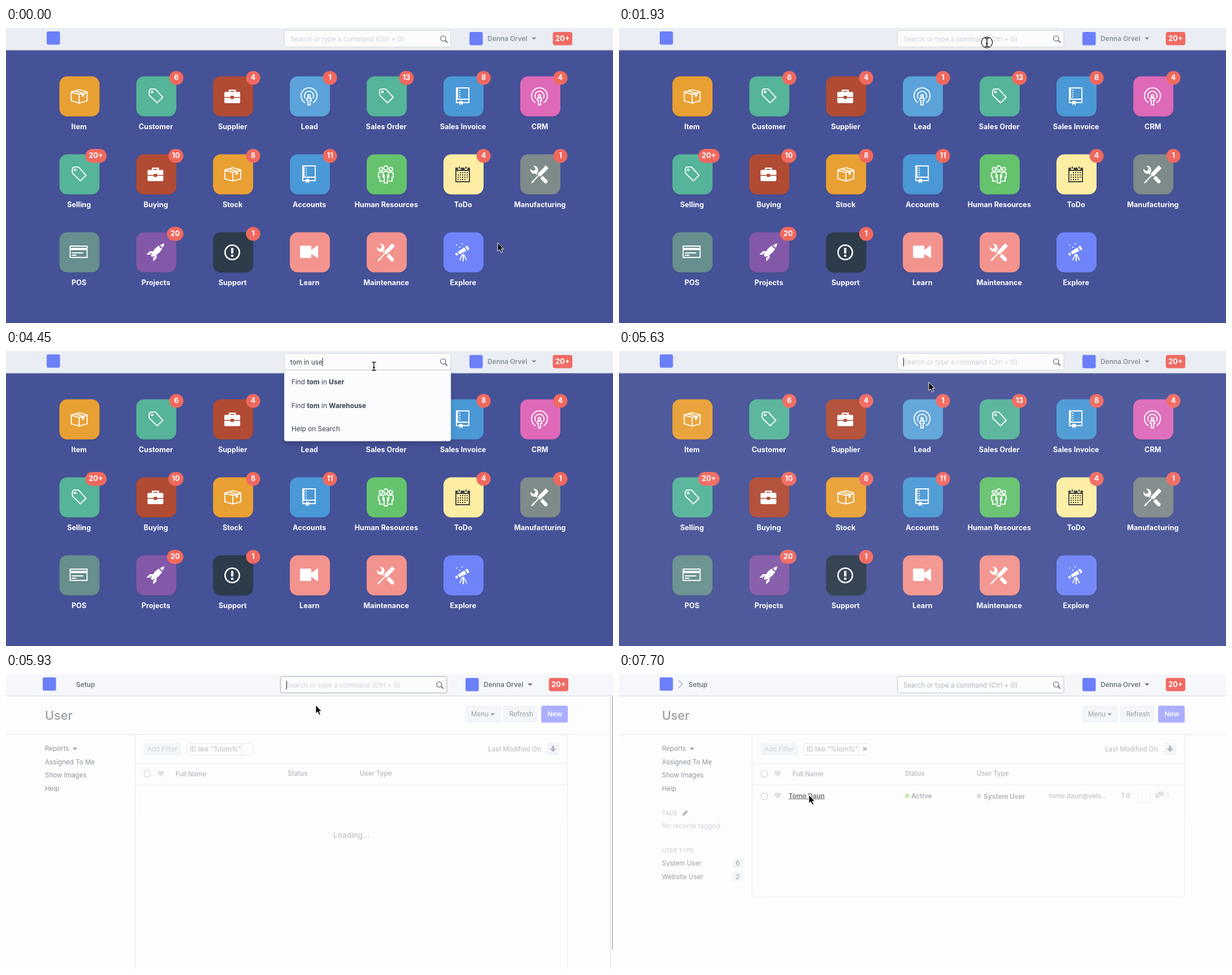
Recreate the animation shown at these times as an HTML page. Size 1074 by 522 pixels, loop 8000 ms.

```html
<!DOCTYPE html>
<html lang="en">
<head>
<meta charset="utf-8">
<title>Desk search</title>
<style>
html, body { margin: 0; height: 100%; overflow: hidden; background: #fdfdfd; }
svg { display: block; width: 100vw; height: 100vh; }
text { font: 11.6px Inter, Roboto, sans-serif; white-space: pre; }
.b { font-weight: 700; }
.m { font-weight: 500; }
.s { font-weight: 600; font-size: 11.8px; }
.c { text-anchor: middle; }
.label { font-size: 12.65px; fill: #fff; }
.small { font-size: 10.2px; }
.icon { fill: none; stroke: currentColor; stroke-width: .95; color: #fff; }
.icon .f { fill: currentColor; stroke: none; }
.tile { filter: drop-shadow(0 1px 1px rgba(0,0,0,.12)); }
.dark { fill: #1f2d3a; }
.grey { fill: #6c7680; }
.pale { fill: #a3adb7; }
.line { fill: none; stroke: #d3d9de; }
.btn { fill: #eaf0f5; }
#menu { filter: drop-shadow(0 5px 5px rgba(0,0,0,.2)); }
#menu text { fill: #36414c; font-size: 11.85px; }
</style>
</head>
<body>
<svg viewBox="0 0 1074 522">
  <g id="desk"><rect width="1074" height="522" fill="#465298"/></g>

  <g id="list">
    <path class="line" d="M0 107.5H1074"/>
    <text class="m" x="76" y="81" fill="#36414c" style="font-size:21.7px">User</text>
    <g class="btn">
      <rect x="819" y="56" width="64" height="30" rx="3"/>
      <rect x="886" y="56" width="61" height="30" rx="3"/>
      <rect x="251" y="122" width="66" height="22" rx="3"/>
      <rect x="964" y="122" width="22" height="22" rx="3"/>
    </g>
    <rect x="954" y="56" width="47" height="30" rx="3" fill="#5e64ff"/>
    <g fill="#36414c">
      <text x="830" y="75">Menu</text><path d="M864 69.5h8l-4 4z"/>
      <text class="c" x="918.5" y="75">Refresh</text>
    </g>
    <text class="c s" x="978" y="75" fill="#fff">New</text>
    <g class="dark">
      <text x="76" y="136">Reports</text><path d="M125 130.5h8l-4 4z"/>
      <text x="76" y="159.5">Assigned To Me</text>
      <text x="76" y="183">Show Images</text>
      <text x="76" y="206.5">Help</text>
    </g>
    <path class="line" d="M235.5 158.5H1000.5M235.5 196.5H1000.5"/>
    <rect class="line" x="326.5" y="122.5" width="118" height="21" rx="2"/>
    <path class="line" d="M424.5 122.5v21"/>
    <g class="grey">
      <text class="pale" x="257" y="137">Add Filter</text>
      <text x="332" y="137">ID like "%tom%"</text>
      <text x="860" y="137">Last Modified On</text>
      <path d="M973 127h4v5h4l-6 6l-6-6h4z"/>
      <text class="m" x="307" y="181">Full Name</text>
      <text class="m" x="505.5" y="180">Status</text>
      <text class="m" x="633" y="180">User Type</text>
    </g>
    <rect x="251.5" y="171" width="11" height="11" rx="2.5" fill="#fff" stroke="#8d99a6"/>
    <path id="heart" fill="#c3cad1" d="M281 182l-5-5.5a3 3 0 0 1 5-4.5a3 3 0 0 1 5 4.5z"/>
    <g id="loading">
      <path class="line" d="M235.5 108V522M1000.5 108V522"/>
      <text class="c grey" x="618" y="290" style="font-size:13.7px">Loading...</text>
    </g>
    <g id="loaded">
      <path class="line" d="M235.5 108V394.5H1000.5V108"/>
      <path d="M432 129.5l6 6m0-6l-6 6" stroke="#6c7680" stroke-width="2.2"/>
      <rect x="251.5" y="211" width="11" height="11" rx="2.5" fill="#fff" stroke="#8d99a6"/>
      <use href="#heart" y="39"/>
      <text id="name" class="b" x="300" y="219.5">Tomo Daun</text>
      <circle cx="510" cy="215.5" r="4" fill="#98d85b"/>
      <text class="b grey" x="517" y="219.5" style="font-size:11.8px">Active</text>
      <circle cx="637" cy="216" r="4" fill="#b8c2cc"/>
      <text class="b grey" x="645" y="220.5" style="font-size:11.8px">System User</text>
      <text class="grey" x="761" y="219.5">tomo.daun@vels…</text>
      <text class="grey" x="889" y="219">1 d</text>
      <rect class="line" x="918" y="204.5" width="22.5" height="22.5" rx="3" stroke-dasharray="3 2"/>
      <g class="pale" opacity=".7">
        <path d="M954 208h10v7h-3l-2 2v-2h-5zM949 211h4v5h5l-2 3h-2l-3 3v-3h-2z"/>
        <text x="967" y="219">0</text>
      </g>
      <text class="small m pale" x="76" y="250">TAGS</text>
      <path class="grey" d="M112 251l1-4l6-6l3 3l-6 6z"/>
      <text class="pale" x="76" y="273">No records tagged.</text>
      <text class="small m pale" x="76" y="316">USER TYPE</text>
      <g class="btn"><rect x="200" y="326" width="20" height="18" rx="6"/><rect x="200" y="349" width="20" height="18" rx="6"/></g>
      <g fill="#36414c">
        <text x="76" y="339">System User</text><text class="c" x="210" y="339">6</text>
        <text x="76" y="362.5">Website User</text><text class="c" x="210" y="362.5">2</text>
      </g>
    </g>
  </g>

  <g id="scroll">
    <rect x="1069" width="5" height="522" fill="#fff"/>
    <path class="line" d="M1069.5 0V522"/>
    <path d="M1073.5 2V488" stroke="#8a8a8a"/>
  </g>

  <rect width="1074" height="39.3" fill="#f5f7fa" fill-opacity=".94"/>
  <path class="line" d="M0 38.8H1074"/>
  <g id="nav">
    <rect x="72" y="6" width="23.5" height="23.5" rx="3" fill="#6b80f8"/>
    <g id="crumb">
      <path id="chevron" d="M105.5 11.5l6.5 6.5l-6.5 6.5" fill="none" stroke="#bcc4cc" stroke-width="1.8"/>
      <text id="setup" class="s grey" y="22.5">Setup</text>
    </g>
    <rect id="field" x="492.5" y="4.5" width="294.5" height="29" rx="3" fill="#fcfcfd"/>
    <text id="hint" x="503" y="23.5">Search or type a command (Ctrl + G)</text>
    <text id="typed" x="503" y="23.5" fill="#36414c"></text>
    <path id="caret" d="M0 12V27" stroke="#222"/>
    <path d="M776.5 21.5L781 26" stroke="#6c7680" stroke-width="2"/>
    <circle cx="773.5" cy="18.5" r="4.6" fill="none" stroke="#6c7680" stroke-width="1.4"/>
    <rect x="820" y="7" width="23.5" height="23.5" rx="3" fill="#6b80f8"/>
    <g id="user"><text class="s" x="852" y="22.5">Denna Orvel</text><path d="M930 16.5h8.5l-4.25 4.5z"/></g>
    <rect x="967.5" y="7" width="34.5" height="23.5" rx="4" fill="#ef6b64"/>
    <text class="b c" x="984.7" y="23" fill="#fff" style="font-size:12.8px">20+</text>
  </g>

  <g id="menu">
    <path id="panel" fill="#fbfcfe" stroke="#d5dae0" stroke-width=".8"/>
    <rect id="hover" x="493" y="34.5" width="293.5" height="41" fill="#f0f4f7"/>
    <g id="recent"><text x="505" y="59">User List</text><text x="505" y="100.5">Help on Search</text></g>
    <g id="found">
      <text x="505" y="59">Find <tspan class="b">tom</tspan> in <tspan class="b">User</tspan></text>
      <text x="505" y="100.5">Find <tspan class="b">tom</tspan> in <tspan class="b">Warehouse</tspan></text>
      <text x="505" y="142">Help on Search</text>
    </g>
  </g>

  <g id="cursor">
    <circle id="ring" r="9.7" fill="#fff" fill-opacity=".6" stroke="#222" stroke-width="1.3"/>
    <path id="arrow" d="M0 0V15L3.5 11.9L6 17.5L8.5 16.4L6.1 11H10.5Z" fill="#000" stroke="#fff"/>
    <path id="beam" d="M-3.5 -7.5Q0 -7.5 0 -5.5Q0 -7.5 3.5 -7.5M0 -6V6M-3.5 7.5Q0 7.5 0 5.5Q0 7.5 3.5 7.5M-2 2H2" fill="none" stroke="#111" stroke-width="1.4"/>
  </g>
</svg>
<script>
const $ = id => document.getElementById(id);
const path = (d, extra = '') => `<path d="${d}" ${extra}/>`;
const fill = d => path(d, 'class="f"');
const dot = (x, y, r, extra = '') => `<circle cx="${x}" cy="${y}" r="${r}" ${extra}/>`;

// Icons sit on a grid 16 units high; each entry is [width, shapes].
const icons = {
  box: [16, path('M1.5 4.1V11.9L8.5 13.9L15.5 11.9V4.1L8.5 2.1ZM1.5 4.4L8.5 6.2L15.5 4.4M8.5 6.2V13.9M4.7 3.2L11.8 5.2') + fill('M11 5.4L13 4.9V8L11 8.5Z')],
  tag: [14, path('M6 1.45H3.5A2 2 0 0 0 1.45 3.5V6Q1.45 6.8 2.05 7.4L8.5 13.7L13.5 8.85L7.4 2.05Q6.8 1.45 6 1.45Z') + fill('M3 3h2v2H3Z')],
  bag: [14, path('M4.5 4.5V2.6H9.5V4.5', 'stroke-width="1.3"') +
    fill('M1 4H13Q14 4 14 5V8.5H8.5V7.5H5.5V8.5H0V5Q0 4 1 4ZM0 9.3H5.5V10.3H8.5V9.3H14V13Q14 14 13 14H1Q0 14 0 13Z')],
  cast: [15, path('M4 13.6A7.05 7.05 0 1 1 11 13.6M4.1 9.7A4.05 4.05 0 1 1 10.9 9.7') +
    path('M6.5 7Q6.5 6.5 7 6.5H8Q8.5 6.5 8.5 7V8Q8.5 8.5 8 8.5H7Q6.5 8.5 6.5 8ZM5.5 11.5V10.3Q5.5 9.5 6.3 9.5H8.7Q9.5 9.5 9.5 10.3V11.5H8.5V15.5H6.5V11.5Z')],
  book: [12, path('M6 13.5H11.5V.5H.5V13.5H3M.5 10.5H11.5M1.5 1V10') + path('M3.5 2V9', 'stroke-dasharray="1"') + fill('M3 12H6V16L4.5 14.5L3 16Z')],
  people: [16, dot(8, 2.4, 1.9) + dot(3.6, 3.4, 1.5) + dot(12.4, 3.4, 1.5) +
    path('M5.5 11V7.5Q5.5 5.5 7 5.5H9Q10.5 5.5 10.5 7.5V11M6.5 8V15.5H9.5V8') +
    path('M5 6H3Q1.5 6 1.5 7.5V10.5H2.5V14H5.5M11 6H13Q14.5 6 14.5 7.5V10.5H13.5V14H10.5')],
  calendar: [15, path('M1.5 2.5H13.5V14.5H1.5Z') + fill('M1 2H14V5H1Z') + path('M4.5 1V4M10.5 1V4', 'stroke="#fdeea4" stroke-width="2.4"') +
    path('M4.5 1V3M10.5 1V3') + path('M5 6.5H12M3 8.5H12M3 10.5H12M3 12.5H10', 'stroke-dasharray="1"')],
  tools: [16, fill('M4.5 7.3L5.8 8.6L6.3 8L5.4 7.1L7.1 5.3L6.7 4.9C7 3.7 6.7 2.3 5.8 1.4C4.9 .5 3.7 .2 2.5 .5L4.45 2.5L3.9 4.5L2 5L.1 3C-.2 4.2 .1 5.5 1 6.4C1.9 7.4 3.3 7.7 4.5 7.3Z') +
    fill('M10.9 9.2L8.6 11.5L12.4 15.5Q13.6 16.5 14.7 15.5Q15.7 14.3 14.7 13.1Z') +
    fill('M16 2.5L13.55 0L6.3 7.5L7.2 8.4L2.9 12.8L1.9 13.4L.5 15.6L.9 16L3.1 14.6L3.6 13.5L7.9 9.1L8.8 10Z')],
  card: [16, path('M.5 2.5H15.5V12.5H.5Z') + path('M1 5H15', 'stroke-width="2"') + path('M2 8.5H12M2 10.5H6')],
  rocket: [16, fill('M12.2 3.8Q11.4 3 11.2 1.9Q9.4 2.9 7.8 4.5Q7 5.3 6 7H3L0 10H3L5 8Q4.2 10 4 11L5 12Q6 11.8 8 11L6 13V16L9 13V10Q10.7 9 11.45 8.2Q13 6.6 14.1 4.8Q12.9 4.6 12.2 3.8Z') +
    fill('M16 0Q15.6 1.7 14.6 3.7Q12.5 3.5 12.3 1.4Q14 .5 16 0Z')],
  alert: [14, dot(7, 8, 6.35, 'stroke-width="1.3"') + fill('M6 4H8V9H6ZM6 10H8V12H6Z')],
  video: [16, fill('M1 2H9Q10 2 10 3V5.7L15.2 2.1Q16 1.7 16 2.5V12.5Q16 13.3 15.2 12.9L10 9.3V12Q10 13 9 13H1Q0 13 0 12V3Q0 2 1 2Z')],
  scope: [14, fill('M8 9L11 15H10L8 11V16H7V10L5 15H4L6 10ZM6 0H7V1H6ZM4 3H5V4H4ZM1 1H2V2H1Z') +
    fill('M.6 9L1.9 8.1L3.05 10.1L1.5 10.9L1 10.6L.4 9.5ZM8.5 3.6L2.7 7.55L3.95 9.7L10.3 6.7ZM9.35 3L10.6 2.2L11.2 2.3L12.8 4.9L12.5 5.6L11.2 6.2Z')]
};

const orange = '#e9a033', green = '#55b499', rust = '#b14b34', blue = '#4a98d6', coral = '#f3938e';
const tiles = [
  ['Item', orange, 'box'], ['Customer', green, 'tag', '6'], ['Supplier', rust, 'bag', '4'], ['Lead', '#5ba3da', 'cast', '1'],
  ['Sales Order', green, 'tag', '13'], ['Sales Invoice', blue, 'book', '8'], ['CRM', '#de69b8', 'cast', '4'],
  ['Selling', green, 'tag', '20+'], ['Buying', rust, 'bag', '10'], ['Stock', orange, 'box', '8'], ['Accounts', blue, 'book', '11'],
  ['Human Resources', '#65c36e', 'people'], ['ToDo', '#fdeea4', 'calendar', '4'], ['Manufacturing', '#7f8a8a', 'tools', '1'],
  ['POS', '#678f8e', 'card'], ['Projects', '#8358a8', 'rocket', '20'], ['Support', '#2d3b4b', 'alert', '1'],
  ['Learn', coral, 'video'], ['Maintenance', coral, 'tools'], ['Explore', '#6e84f8', 'scope']
];

function tile([label, color, icon, count], i) {
  const x = 94.5 + 135.9 * (i % 7), y = 85.5 + 138 * Math.floor(i / 7);
  const [w, shapes] = icons[icon];
  const badge = count ? `<g class="badge"><rect y="-9.5" height="24.5" rx="12.25" fill="#f0695f"/>
    <text class="b c label" y="6.5">${count}</text></g>` : '';
  const ink = icon === 'calendar' ? 'style="color:#43433f"' : '';
  return `<g transform="translate(${x} ${y})">
    <rect class="tile" width="71" height="71" rx="14" fill="${color}"/>
    <g class="icon" ${ink} transform="translate(${34 - w} 19.5) scale(2)">${shapes}</g>${badge}
    <text class="b c label" x="34.7" y="93.5">${label}</text></g>`;
}
$('desk').innerHTML += tiles.map(tile).join('');

// Badges grow to the left with their text.
for (const badge of document.querySelectorAll('.badge')) {
  const [rect, text] = badge.children;
  const w = Math.max(25, text.getComputedTextLength() + 12.6);
  rect.setAttribute('x', 83.5 - w);
  rect.setAttribute('width', w);
  text.setAttribute('x', 83.5 - w / 2);
}

const show = (id, on) => $(id).setAttribute('display', on ? 'inline' : 'none');
const set = (id, attrs) => { for (const k in attrs) $(id).setAttribute(k, attrs[k]); };
// Number of steps taken out of n, spread evenly from a to b.
const steps = (t, a, b, n) => t < a ? 0 : Math.min(n, 1 + Math.floor((t - a) / (b - a) * (n - 1) + .1));
const smooth = p => p * p * (3 - 2 * p);

function pointer(t) {
  const k1 = steps(t, 900, 1930, 8), k2 = steps(t, 4890, 5930, 8), k3 = steps(t, 6530, 7550, 8);
  if (k3) {
    const q = Math.min(1, k3 / 7);
    return { x: 548 - 212 * q * (2 - q), y: 55 + 159 * q * (2.83 - 1.83 * q), ring: k3 === 8 && t < 7700 };
  }
  if (k2) {
    const p = Math.min(1, k2 / 4);
    return { x: 651 - 103 * p, y: 27 + 28 * p, ring: k2 === 4 };
  }
  const p = smooth(Math.min(1, k1 / 7)), click = k1 === 8 && t < 2070;
  return { x: 870 - 219 * p, y: 380 - (t < 2070 ? 354.5 : 353) * p, ring: click };
}

function typedAt(t) {
  if (t < 2810 || t >= 5480) return '';
  if (t < 2960) return 't';
  return ['to', 'tom', 'tom ', 'tom i', 'tom in', 'tom in u', 'tom in us', 'tom in use'][steps(t, 3260, 4150, 7)];
}

function draw(t) {
  const onList = t >= 5930, narrow = onList && t < 6080, ready = t >= 6080;
  const shift = `translate(${narrow ? -7 : 0} 0)`;

  show('desk', !onList);
  set('desk', { opacity: t < 5630 ? 1 : t < 5780 ? .95 : .5 });
  show('list', onList);
  set('list', { transform: shift, opacity: narrow || t >= 7700 ? .5 : t < 6230 ? .75 : 1 });
  show('loading', narrow);
  show('loaded', ready);
  show('scroll', narrow);
  const over = steps(t, 6530, 7550, 8) >= 6;
  set('name', { 'text-decoration': over ? 'underline' : 'none', fill: over ? '#000' : '#1a222a' });

  set('nav', { transform: shift });
  show('crumb', onList);
  show('chevron', ready);
  set('setup', { x: narrow ? 131 : 123 });
  set('user', { fill: t < 5780 ? '#8a929b' : '#6c7680' });

  const word = typedAt(t), focus = t >= 2070 && t < 6230;
  $('typed').textContent = word;
  show('hint', !word);
  set('hint', { fill: ready ? '#acb4bd' : '#cbd0d7' });
  set('field', { stroke: t >= 5780 && focus ? '#a3acb6' : ready ? '#c0c7ce' : '#d3d8de' });
  show('caret', t >= 2070 && t < 6530);
  set('caret', { transform: `translate(${503.5 + (word ? $('typed').getComputedTextLength() : 0)} 0)` });

  const found = t >= 4450, p = pointer(t), beam = p.y < 36;
  show('menu', t >= 2070 && t < 5480);
  set('panel', { d: `M492.5 34H787V${found ? 156.3 : 114.3}q0 3 -3 3H495.5q-3 0 -3 -3Z` });
  show('recent', !found);
  show('found', found);
  show('hover', found && !beam);

  set('cursor', { transform: `translate(${p.x} ${p.y})` });
  show('beam', beam);
  show('arrow', !beam);
  show('ring', p.ring);
}

const start = performance.now();
function loop() {
  draw((performance.now() - start) % 8000);
  requestAnimationFrame(loop);
}
loop();
</script>
</body>
</html>
```
